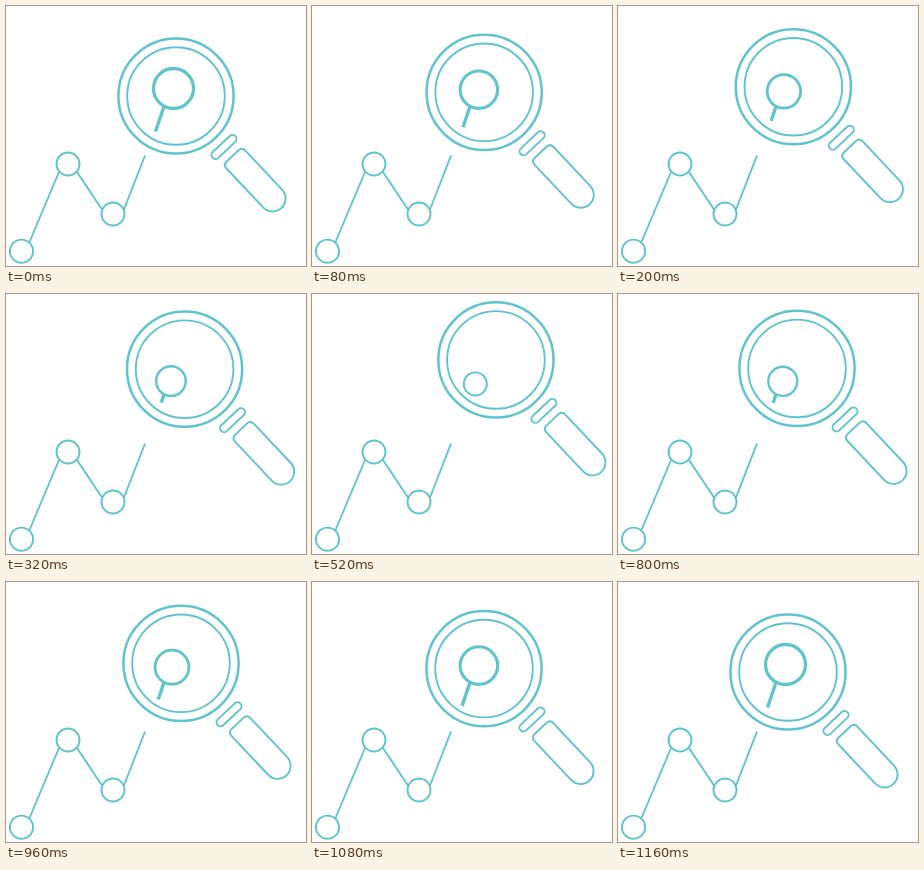
These frames come from a looping animation (300x260 px, 1.28 s). An HTML page:

```html
<!DOCTYPE html>
<html lang="en">
<head>
<meta charset="utf-8">
<title>Chart under a magnifier</title>
<style>
  html, body { margin: 0; height: 100%; overflow: hidden; background: #fff; }
  svg { display: block; width: 100%; height: 100%; }
</style>
</head>
<body>
<svg viewBox="0 0 300 260" fill="none" stroke="#60c4cc" stroke-width="1.9">
  <g id="chart">
    <circle cx="15.5" cy="245.2" r="11.6"/>
    <circle cx="62" cy="158" r="11.5"/>
    <circle cx="107" cy="208" r="11.5"/>
    <path d="M23.5 236L53 166M71 166L96 203.500M118 203.500L139 149.500"/>
  </g>
  <path id="stem" stroke-width="3.4"/>
  <circle id="dot"/>
  <g id="glass">
    <circle r="57.6" stroke-width="2.5"/>
    <circle r="48.8"/>
    <g transform="rotate(46.7)">
      <rect x="66" y="-15.700" width="8" height="31.400" rx="4"/>
      <path d="M87.400 -13H140.800A13 13 0 0 1 140.800 13H87.400Q82.400 13 82.400 8V-8Q82.400 -13 87.400 -13Z"/>
    </g>
  </g>
</svg>
<script>
const LOOP = 1280, STEP = 40, PEAK = 560, END = 1160;
const [stem, dot, glass] = ["stem", "dot", "glass"].map(id => document.getElementById(id));
const clamp = v => Math.max(0, Math.min(1, v));

function set(el, attrs) {
  for (const key in attrs) el.setAttribute(key, attrs[key]);
}

function draw(now) {
  const t = Math.min(END, Math.floor(now % LOOP / STEP) * STEP);
  // u: 0 = glass over the point, 1 = glass moved away
  const u = t <= PEAK ? t / PEAK : (END - t) / (END - PEAK);
  const len = t <= PEAK ? clamp(1 - t / 470) : clamp((t - 640) / 470);

  set(glass, { transform: `translate(${170 + 15 * u} ${90 - 25.9 * u})` });
  set(dot, {
    cx: 167.5 - 4.5 * u,
    cy: 82.5 + 8 * u,
    r: 20 - 9.1 * u,
    "stroke-width": 3.3 - 1.5 * u
  });
  set(stem, {
    d: `M158 100.5l${-8.5 * len} ${25 * len}`,
    visibility: len ? "visible" : "hidden"
  });
  requestAnimationFrame(draw);
}
draw(performance.now());
</script>
</body>
</html>
```
